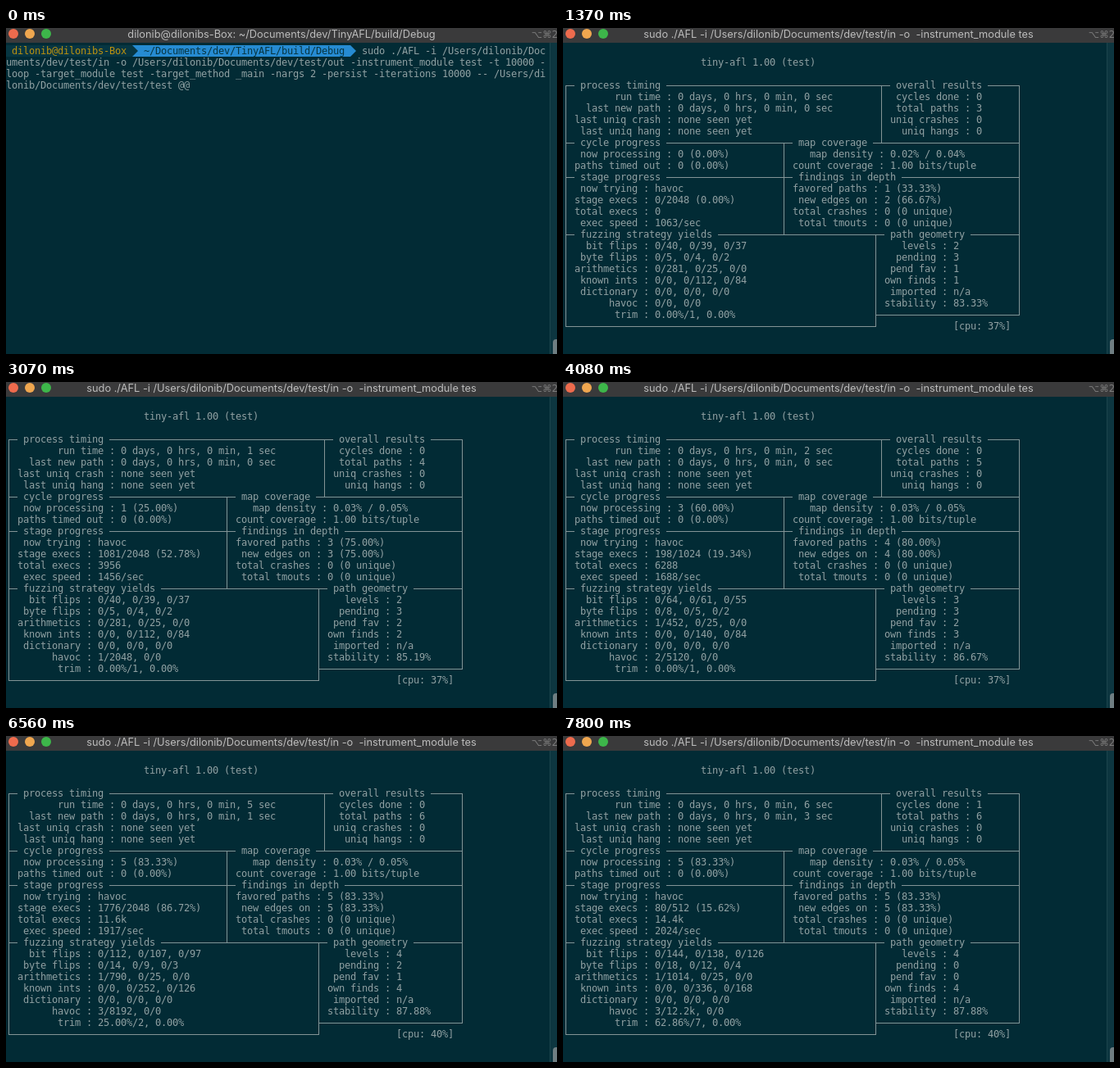
Write an HTML page with a canvas that moves like this. It is 672x398 px and loops after 8 s.

```html
<!DOCTYPE html>
<html lang="en">
<head>
<meta charset="utf-8">
<title>Terminal</title>
<style>
html, body { margin: 0; width: 100%; height: 100%; overflow: hidden; background: #022b35; }
canvas { display: block; }
</style>
</head>
<body>
<canvas id="stage" width="672" height="398"></canvas>
<script>
const ctx = document.getElementById('stage').getContext('2d');
const LOOP = 8000, CELL = 7, ROW = 14, TOP = 21;
const BG = '#022b35', FG = '#91a1a3', LINE = '#839496', BLUE = '#268bd2', DARK = '#073642';
const MONO = '12px "DejaVu Sans Mono", monospace';
const USER = 'dilonib', HOST = USER + 's-Box', DIR = '~/Documents/dev/TinyAFL/build/Debug';

const rect = (x, y, w, h, color) => { ctx.fillStyle = color; ctx.fillRect(x, y, w, h); };

// ---- character grid ----
function put(col, row, text, color = FG) {
  ctx.font = MONO;
  ctx.textAlign = 'left';
  ctx.fillStyle = color;
  [...text].forEach((ch, i) => {
    if (ch !== ' ') ctx.fillText(ch, (col + i) * CELL, TOP + 11 + row * ROW);
  });
}
const field = (col, row, label, value) => put(col - 3 - label.length, row, `${label} : ${value}`);
const fields = (col, row, pairs) => pairs.forEach(([label, value], i) => field(col, row + i, label, value));
const midX = col => col * CELL + 3;
const midY = row => TOP + 7 + row * ROW;
const hline = (row, x0, x1) => rect(x0, midY(row), x1 - x0, 1, LINE);
const vline = (col, r0, r1) => rect(midX(col), midY(r0), 1, midY(r1) - midY(r0) + 1, LINE);

// Horizontal rule from column a to b, interrupted by [column, title] pairs
function rule(row, a, b, titles = []) {
  let x = midX(a);
  for (const [col, title] of titles) {
    hline(row, x, (col - 1) * CELL);
    put(col, row, title);
    x = (col + title.length + 1) * CELL;
  }
  hline(row, x, midX(b) + 1);
}

// ---- window ----
function drawChrome(title) {
  rect(0, 0, 672, 398, BG);
  rect(0, 0, 672, 18, '#3a3a3b');
  ['#ee6b4d', '#efa64f', '#3db64a'].forEach((color, i) => {
    ctx.fillStyle = color;
    ctx.beginPath();
    ctx.arc(9 + i * 20, 7, 6, 0, 7);
    ctx.fill();
  });
  ctx.fillStyle = '#bcbcbc';
  ctx.font = '12.8px Inter, "Liberation Sans", sans-serif';
  ctx.textAlign = 'center';
  ctx.fillText(title, 336, 12);
  ctx.fillStyle = '#7c7c7c';
  ctx.font = '11.5px "DejaVu Sans", sans-serif';
  ctx.textAlign = 'left';
  ctx.fillText('⌥⌘2', 641, 12);
  rect(663, 18, 9, 380, '#0d3640');
  rect(663, 18, 1, 380, '#1b444d');
  ctx.fillStyle = '#6f7e82';
  ctx.beginPath();
  ctx.roundRect(667, 380, 8, 30, 4);
  ctx.fill();
}

function segment(a, b, color) {
  const x = b * CELL;
  rect(a * CELL, TOP, x - a * CELL, ROW, color);
  ctx.beginPath();
  ctx.moveTo(x, TOP);
  ctx.lineTo(x + CELL, TOP + ROW / 2);
  ctx.lineTo(x, TOP + ROW);
  ctx.fill();
}

function drawPrompt(banner) {
  segment(22, 60, BLUE);
  segment(0, 22, DARK);
  put(1, 0, `${USER}@${HOST}`, '#bd9210');
  put(24, 0, DIR, DARK);
  const home = `/Users/${USER}/Documents/dev/test`;
  const line = ' '.repeat(62) + `sudo ./AFL -i ${home}/in -o ${home}/out -instrument_module test -t 10000 ` +
    `-loop -target_module test -target_method _main -nargs 2 -persist -iterations 10000 -- ${home}/test @@`;
  line.match(/.{1,94}/g).forEach((part, row) => put(0, row, part));
  if (!banner) return;
  put(0, 5, 'tiny-afl 1.00 by <dilonibq42@mail.test>');
  put(0, 6, 'Based on TinyInst by <pelmoric@inbox.test>');
}

// ---- fuzzer model ----
const STATS_AT = 1270, FUZZ_START = 1260;
const burst = [230, 230, 195, 195, 195, 195];
const gaps = [175, 205, 205, 205, 170, 202, 202, 202, 202, 202, 230, 203, 203, 204, ...burst, ...burst, ...burst];
// time, total execs, execs per second
const keys = [[2060, 1768, 1239], [4080, 6288, 1688], [5320, 9038, 1854], [6560, 11600, 1917], [7800, 14400, 2024]];
const finds = [FUZZ_START, 2400, 3200, 4700];   // when each new path turns up

const yields = [
  { bit: '0/40, 0/39, 0/37', byte: '0/5, 0/4, 0/2', arith: '0/281', ints: '0/112, 0/84' },
  { bit: '0/64, 0/61, 0/55', byte: '0/8, 0/5, 0/2', arith: '1/452', ints: '0/140, 0/84' },
  { bit: '0/80, 0/76, 0/68', byte: '0/10, 0/6, 0/2', arith: '1/565', ints: '0/168, 0/84' },
  { bit: '0/112, 0/107, 0/97', byte: '0/14, 0/9, 0/3', arith: '1/790', ints: '0/252, 0/126' },
  { bit: '0/144, 0/138, 0/126', byte: '0/18, 0/12, 0/4', arith: '1/1014', ints: '0/336, 0/168' },
];
// first exec, length, path id, yields, havoc, favored, pending, pending favored, stability
const stages = [
  [687, 2048, 0, 0, '0/0', 1, 3, 1, '83.33'],
  [2875, 2048, 1, 0, '1/2048', 3, 3, 2, '85.19'],
  [5066, 1024, 2, 1, '2/4096', 4, 3, 2, '86.67'],
  [6090, 1024, 3, 1, '2/5120', 4, 3, 2, '86.67'],
  [7310, 2048, 4, 2, '2/6144', 4, 3, 1, '87.88'],
  [9824, 2048, 5, 3, '3/8192', 5, 2, 1, '87.88'],
  [12000, 1024, 2, 3, '3/10.2k', 5, 2, 1, '87.88'],
  [13150, 1024, 3, 4, '3/11.3k', 5, 1, 0, '87.88'],
  [14320, 512, 5, 4, '3/12.2k', 5, 0, 0, '87.88'],
];

function lastTick(t) {
  let tick = STATS_AT;
  for (const gap of gaps) {
    if (tick + gap > t) break;
    tick += gap;
  }
  return tick;
}

function sample(t) {
  let i = 0;
  while (i < keys.length - 2 && t >= keys[i + 1][0]) i++;
  const [a, b] = [keys[i], keys[i + 1]], k = (t - a[0]) / (b[0] - a[0]);
  return [1, 2].map(j => Math.round(a[j] + (b[j] - a[j]) * k));
}

// Percentage with two decimals, ties to even
function pct(a, b) {
  const n = a / b * 1e4;
  let r = Math.round(n);
  if (r - n === 0.5 && r % 2) r--;
  return (r / 100).toFixed(2) + '%';
}
const part = (a, b) => `${a} (${pct(a, b)})`;
const short = n => n < 10000 ? `${n}` : (n / 1000).toFixed(1) + 'k';
const clock = ms => `0 days, 0 hrs, 0 min, ${Math.floor(ms / 1000)} sec`;

function drawFrame() {
  put(24, 1, 'tiny-afl 1.00 (test)');
  rule(3, 0, 79, [[3, 'process timing'], [58, 'overall results']]);
  rule(8, 0, 79, [[3, 'cycle progress'], [41, 'map coverage']]);
  rule(11, 0, 79, [[3, 'stage progress'], [41, 'findings in depth']]);
  rule(16, 0, 79, [[3, 'fuzzing strategy yields'], [57, 'path geometry']]);
  rule(23, 54, 79);
  rule(24, 0, 54);
  vline(0, 3, 24);
  vline(79, 3, 23);
  vline(55, 3, 8);
  vline(38, 8, 16);
  vline(54, 16, 24);
}

function drawStats(t) {
  const [execs, speed] = sample(t);
  const stage = stages.findLast(s => execs >= s[0]) || stages[0];
  const [first, size, id, group, havoc, favored, pending, pendFav, stability] = stage;
  const done = Math.max(0, Math.min(size, execs - first));
  const seen = finds.filter(f => f <= t);
  const paths = 2 + seen.length, y = yields[group];

  drawFrame();
  fields(20, 4, [
    ['run time', clock(t - FUZZ_START)],
    ['last new path', clock(t - seen.at(-1))],
    ['last uniq crash', 'none seen yet'],
    ['last uniq hang', 'none seen yet'],
  ]);
  fields(72, 4, [
    ['cycles done', t >= 6780 ? 1 : 0],
    ['total paths', paths],
    ['uniq crashes', 0],
    ['uniq hangs', 0],
  ]);
  fields(20, 9, [['now processing', part(id, paths)], ['paths timed out', part(0, paths)]]);
  fields(57, 9, [
    ['map density', paths > 3 ? '0.03% / 0.05%' : '0.02% / 0.04%'],
    ['count coverage', '1.00 bits/tuple'],
  ]);
  fields(16, 12, [
    ['now trying', 'havoc'],
    ['stage execs', `${done}/${size} (${pct(done, size)})`],
    ['total execs', short(execs)],
    ['exec speed', `${speed}/sec`],
  ]);
  fields(56, 12, [
    ['favored paths', part(favored, paths)],
    ['new edges on', part(paths - 1, paths)],
    ['total crashes', '0 (0 unique)'],
    ['total tmouts', '0 (0 unique)'],
  ]);
  fields(16, 17, [
    ['bit flips', y.bit],
    ['byte flips', y.byte],
    ['arithmetics', y.arith + ', 0/25, 0/0'],
    ['known ints', '0/0, ' + y.ints],
    ['dictionary', '0/0, 0/0, 0/0'],
    ['havoc', havoc + ', 0/0'],
    ['trim', ['0.00%/1', '25.00%/2', '62.86%/7'][Math.max(0, group - 2)] + ', 0.00%'],
  ]);
  fields(68, 17, [
    ['levels', Math.max(2, paths - 2)],
    ['pending', pending],
    ['pend fav', pendFav],
    ['own finds', paths - 2],
    ['imported', 'n/a'],
    ['stability', stability + '%'],
  ]);
  put(68, 24, `[cpu: ${t >= 5770 ? 40 : 37}%]`);
}

function draw(now) {
  const t = now % LOOP;
  drawChrome(t < 1060
    ? `${USER}@${HOST}: ${DIR}`
    : `sudo ./AFL -i /Users/${USER}/Documents/dev/test/in -o  -instrument_module tes`);
  if (t < STATS_AT) drawPrompt(t >= 1140);
  else drawStats(lastTick(t));
}

const start = performance.now();
function loop() {
  draw(performance.now() - start);
  requestAnimationFrame(loop);
}
loop();
</script>
</body>
</html>
```
